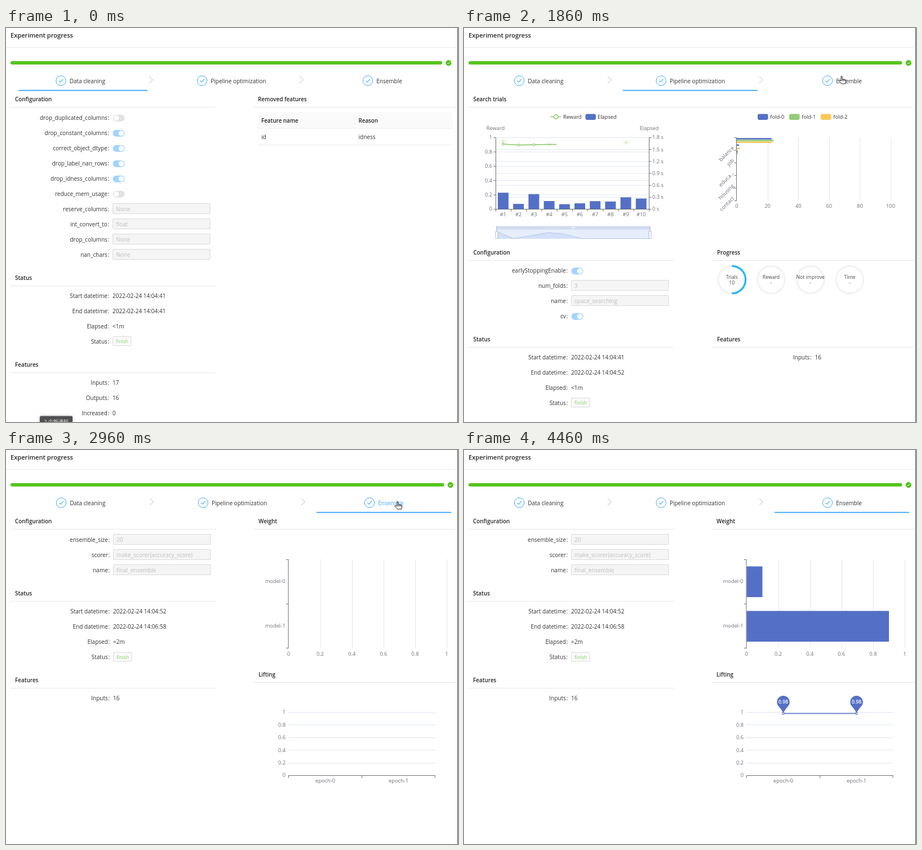
Animation of 802 by 699 pixels, one loop 7.05 s. Source, as an HTML page with a canvas:

```html
<!DOCTYPE html>
<html lang="en">
<head>
<meta charset="utf-8">
<title>Experiment progress</title>
<style>
  html, body { margin: 0; width: 100%; height: 100%; overflow: hidden; background: #fff; }
  canvas { display: block; }
</style>
</head>
<body>
<canvas id="stage" width="802" height="699"></canvas>
<script>
const ctx = document.getElementById('stage').getContext('2d');
const LOOP = 7050, CHART_TIME = 1000;
const PIPELINE_AT = 1480, PIPELINE_CHART = 1465;
const ENSEMBLE_AT = 2960, ENSEMBLE_CHART = 2915;
const FONT = '"Open Sans", "Noto Sans", "Noto Sans CJK SC", sans-serif';
const INK = '#333', AXIS = '#6e7079', GRID = '#e0e6f1', SKY = '#40a9ff';
const BLUE = '#5470c6', GREEN = '#91cc75', YELLOW = '#fac858';

const clamp = v => Math.min(1, Math.max(0, v));
const cubicInOut = p => p < .5 ? 4 * p ** 3 : 1 - 4 * (1 - p) ** 3;

// ---------- drawing helpers ----------
function text(s, x, y, { size = 10, color = INK, align = 'left', weight = 400 } = {}) {
  ctx.font = `${weight} ${size}px ${FONT}`;
  ctx.fillStyle = color;
  ctx.textAlign = align;
  ctx.fillText(s, x, y + size * .36);
}
function rect(x, y, w, h, color) {
  ctx.fillStyle = color;
  ctx.fillRect(x, y, w, h);
}
function box(x, y, w, h, r, fill, stroke) {
  ctx.beginPath();
  ctx.roundRect(x, y, w, h, r);
  ctx.fillStyle = fill;
  ctx.fill();
  if (stroke) { ctx.strokeStyle = stroke; ctx.lineWidth = 1; ctx.stroke(); }
}
function path(points, color, width = 1) {
  ctx.beginPath();
  points.forEach(([x, y]) => ctx.lineTo(x, y));
  ctx.strokeStyle = color;
  ctx.lineWidth = width;
  ctx.stroke();
}
const hline = (x1, x2, y, color) => path([[x1, y], [x2, y]], color);
const vline = (x, y1, y2, color) => path([[x, y1], [x, y2]], color);
function ring(x, y, r, color, width, fill, from = 0, to = 2 * Math.PI) {
  ctx.beginPath();
  ctx.arc(x, y, r, from, to);
  if (fill) { ctx.fillStyle = fill; ctx.fill(); }
  ctx.strokeStyle = color;
  ctx.lineWidth = width;
  ctx.stroke();
}
const tick = (x, y, s, color, width) =>
  path([[x - 3.6 * s, y + .2 * s], [x - 1 * s, y + 2.8 * s], [x + 3.8 * s, y - 2.8 * s]], color, width);
const chartText = (s, x, y, align = 'center', color = AXIS) => text(s, x, y, { size: 9.3, color, align });

// ---------- form parts ----------
function section(title, x, y, from, to) {
  text(title, x, y, { size: 9.9, weight: 600, color: '#262626' });
  hline(from, to, y + 14.5, '#e8e8e8');
}
function label(s, x, y) {
  text(s, x - 9.2, y, { align: 'right' });
  text(':', x - 8.4, y);
}
function valueRow(name, value, x, y) {
  label(name, x, y);
  text(value, x, y);
}
function switchRow(name, on, x, y) {
  label(name, x, y);
  box(x + .5, y - 5.3, 21, 12, 6, on ? '#a3d3ff' : '#e2e2e2');
  ctx.beginPath();
  ctx.arc(x + (on ? 15.5 : 6.5), y + .7, 4.7, 0, 7);
  ctx.fillStyle = '#fff';
  ctx.fill();
}
function fieldRow(name, value, x, y) {
  label(name, x, y);
  box(x + .5, y - 9.5, 172.5, 18, 1, '#f4f5f4', '#d9d9d9');
  text(value, x + 6, y, { color: '#bfbfbf' });
}
function statusRows(x, y, start, end, elapsed) {
  valueRow('Start datetime', start, x, y);
  valueRow('End datetime', end, x, y + 27);
  valueRow('Elapsed', elapsed, x, y + 54);
  label('Status', x, y + 81);
  box(x + .5, y + 72.5, 32.5, 16, 1, '#fafafa', '#d9d9d9');
  text('finish', x + 6, y + 81, { size: 8.7, color: '#87d068' });
}

// ---------- chart parts ----------
function pin(x, y, k, value, color, alpha = k) {
  const cy = y - 20 * k, r = 11.3 * k;
  ctx.save();
  ctx.globalAlpha = alpha;
  ctx.beginPath();
  ctx.arc(x, cy, r, Math.PI * .85, Math.PI * .15);
  ctx.quadraticCurveTo(x + 3.5 * k, cy + 12.5 * k, x, y - k);
  ctx.quadraticCurveTo(x - 3.5 * k, cy + 12.5 * k, x - r * .89, cy + r * .454);
  ctx.fillStyle = color;
  ctx.fill();
  ctx.globalAlpha = alpha * k;
  ctx.font = `600 8.6px ${FONT}`;
  ctx.textAlign = 'center';
  ctx.strokeStyle = color;
  ctx.lineWidth = 2;
  ctx.lineJoin = 'round';
  ctx.strokeText(value, x, cy + 3.1);
  text(value, x, cy, { size: 8.6, color: '#fff', align: 'center', weight: 600 });
  ctx.restore();
}
function sweptLine(points, edge, color, growth) {
  ctx.save();
  ctx.beginPath();
  ctx.rect(0, 0, edge, 699);
  ctx.clip();
  path(points, color, 1.6);
  ctx.restore();
  for (const [x, y] of points) {
    const k = clamp((edge - x) / growth);
    if (k > .15) ring(x, y, 1.8 * k, color, 1.2, '#fff');
  }
}

// ---------- pages ----------
function header(page, hovered) {
  const first = page === 0;
  text('Experiment progress', 8, 13.5, { size: 11.1, weight: 600, color: '#262626' });
  hline(0, 800, 34.5, '#ececec');
  const end = first ? 774 : 777.5;
  box(8, 58.7, end - 8, 6, 3, '#52c41a');
  ring(end + 11.2, 62, 4.7, '#52c41a', 1, '#52c41a');
  tick(end + 11.2, 62, .6, '#fff', 1);

  const names = ['Data cleaning', 'Pipeline optimization', 'Ensemble'];
  const icons = first ? [97.5, 348, 642] : [98, 349.7, 645];
  icons.forEach((x, i) => {
    ring(x, 93.5, 8.7, SKY, 1, '#fff');
    tick(x, 93.5, 1, SKY, 1.1);
    text(names[i], x + 15.2, 94, { color: i === hovered ? SKY : INK });
  });
  for (const x of first ? [254, 521] : [255, 524])
    path([[x, 86], [x + 6.5, 92], [x, 98]], '#bfbfbf');
  const [from, to] = [[22.5, 251], [282, 521], [551, 790]][page];
  rect(from, 109.8, to - from, 1.9, SKY);
  rect(801, 0, 1, 699, '#4a4a4a');
}

function cleaningPage() {
  const x = 189;
  section('Configuration', 16, 126, 8, 371);
  [['drop_duplicated_columns', 0], ['drop_constant_columns', 1], ['correct_object_dtype', 1],
   ['drop_label_nan_rows', 1], ['drop_idness_columns', 1], ['reduce_mem_usage', 0]]
    .forEach(([name, on], i) => switchRow(name, on, x, 159 + 27 * i));
  [['reserve_columns', 'None'], ['int_convert_to', 'float'], ['drop_columns', 'None'], ['nan_chars', 'None']]
    .forEach(([name, value], i) => fieldRow(name, value, x, 321 + 27 * i));
  section('Status', 16, 443, 8, 371);
  statusRows(x, 475, '2022-02-24 14:04:41', '2022-02-24 14:04:41', '<1m');
  section('Features', 16, 597, 8, 371);
  [['Inputs', 17], ['Outputs', 16], ['Increased', 0]]
    .forEach(([name, n], i) => valueRow(name, n, x, 629.5 + 27 * i));

  section('Removed features', 447, 126, 439, 800);
  rect(447, 149.5, 345, 29, '#fafafa');
  hline(447, 792, 178.5, '#f0f0f0');
  vline(619.5, 157, 171, '#ececec');
  hline(447, 792, 207.5, '#ececec');
  const bold = { size: 9.8, weight: 600, color: '#262626' };
  text('Feature name', 453, 164, bold);
  text('Reason', 625.5, 164, bold);
  text('id', 453, 193.5);
  text('idness', 625.5, 193.5);
}

function trialsChart(p) {
  const k = cubicInOut(p), left = 56.5, right = 328.5, top = 194.5, base = 321.5, band = 27.2;
  path([[154, 157.5], [172, 157.5]], GREEN, 1.8);
  ring(163, 157.5, 3.6, GREEN, 1.6, '#fff');
  chartText('Reward', 176, 157.5, 'left', INK);
  box(215.5, 152.5, 18.5, 10.5, 3, BLUE);
  chartText('Elapsed', 237, 157.5, 'left', INK);
  chartText('Reward', 56, 178);
  chartText('Elapsed', 328.5, 178);

  for (let i = 0; i <= 5; i++) {
    const y = top + i * 25.4;
    hline(left, right, y, GRID);
    hline(left - 4, left, y, AXIS);
    chartText(String((10 - 2 * i) / 10), 50, y - .5, 'right');
  }
  for (let i = 0; i <= 6; i++) {
    const y = top + i * 21.17;
    hline(left, right, y, GRID);
    hline(right, right + 4, y, AXIS);
    chartText(i === 6 ? '0 s' : (1.8 - .3 * i).toFixed(1) + ' s', 334, y - .5, 'left');
  }
  [118, 38, 108, 58.5, 36, 42, 57.5, 55, 85, 76.5].forEach((h, i) => {
    rect(60 + band * i, base - h * k, 19, h * k, BLUE);
    chartText('#' + (i + 1), 69.5 + band * i, 331);
  });
  vline(left, top, base, AXIS);
  vline(right, top, base, AXIS);
  hline(left, right, base, AXIS);
  for (let i = 0; i <= 10; i++) vline(left + band * i, base, base + 4, AXIS);

  const rewards = [206, 207.6, 207.1, 206.5, 206.8, 207.6, 207.6, 207.6, 207.6, 207.6]
    .map((y, i) => [69.5 + band * i, y]);
  sweptLine(rewards, left + (right - left) * p + 6 * clamp(p * 10 - 8.5), GREEN, 25);
  if (k > 0) {
    pin(69.3, 206, k, '0.90', GREEN);
    pin(287.3, 207.6, k, '0.89', GREEN);
  }
}

function zoomSlider() {
  rect(57, 351.5, 274, 22.5, '#e6eefb');
  rect(57, 351.5, 274, 6, '#d2dbee');
  rect(191, 353.5, 6, 1.5, '#fff');
  const shape = [[58, 361], [88, 373.5], [150, 363], [177, 365.5], [208, 373.5], [330, 373.5]];
  ctx.beginPath();
  ctx.moveTo(58, 374);
  shape.forEach(([x, y]) => ctx.lineTo(x, y));
  ctx.fillStyle = '#d3e0f8';
  ctx.fill();
  path(shape, '#b5c5e9');
  for (const x of [58, 330]) {
    vline(x, 351.5, 374, '#acb8d1');
    box(x - 2, 360.5, 4, 13, 1, '#fff', '#acb8d1');
  }
}

function importanceChart(k) {
  [BLUE, GREEN, YELLOW].forEach((color, i) => {
    box(521 + 56 * i, 152.5, 18.5, 10.5, 3, color);
    chartText('fold-' + i, 543.3 + 56 * i, 157.5, 'left', INK);
  });
  for (let i = 0; i <= 5; i++) {
    const x = 484 + 54.6 * i;
    if (i) vline(Math.round(x) + .5, 194, 306.5, GRID);
    chartText(20 * i, x, 316);
  }
  [[250, 263.5, 251], [16.5, 0, 22], [6.5, 9, 0]].forEach((group, g) =>
    group.forEach((w, i) => rect(484, 195.2 + 11.3 * g + 3.1 * i, w * k, 2.6, [BLUE, GREEN, YELLOW][i])));
  vline(483.5, 194, 306.5, AXIS);
  for (let i = 0; i <= 5; i++) hline(479.5, 483.5, 194.5 + 22.4 * i, AXIS);
  ['balance', 'job', 'educa...', 'housing', 'contact'].forEach((name, i) => {
    ctx.save();
    ctx.translate(477.5, 211 + 22.4 * i);
    ctx.rotate(-Math.PI / 4);
    chartText(name, 0, 0, 'right');
    ctx.restore();
  });
}

function pipelinePage(p) {
  const x = 190;
  section('Search trials', 16.5, 126, 8, 800);
  trialsChart(p);
  zoomSlider();
  importanceChart(cubicInOut(p));

  section('Configuration', 16.5, 398, 8, 372);
  switchRow('earlyStoppingEnable', 1, x, 430.5);
  fieldRow('num_folds', '3', x, 457);
  fieldRow('name', 'space_searching', x, 484);
  switchRow('cv', 1, x, 511);
  section('Status', 16.5, 552, 8, 372);
  statusRows(x, 584, '2022-02-24 14:04:41', '2022-02-24 14:04:52', '<1m');

  section('Progress', 449, 398, 441, 800);
  [['Trials', 10], ['Reward', '-'], ['Not improve', '-'], ['Time', '-']].forEach(([name, value], i) => {
    const cx = 475.3 + 69.7 * i;
    ring(cx, 446.5, 24.3, '#f3f3f3', 3.4);
    if (!i) ring(cx, 446.5, 24.3, '#2db7f5', 3.4, null, -Math.PI / 2, Math.PI / 2);
    text(name, cx, 441.5, { size: 8.7, align: 'center', color: '#444' });
    text(value, cx, 452, { size: 8.7, align: 'center', color: '#444' });
  });
  section('Features', 449, 552, 441, 800);
  valueRow('Inputs', 16, 622.5, 584);
}

function weightChart(k) {
  for (let i = 0; i <= 5; i++) {
    const x = 501.5 + 56.1 * i;
    if (i) vline(Math.round(x) + .5, 194, 352, GRID);
    chartText(String(2 * i / 10), x, 362);
  }
  rect(501.5, 206.5, 28 * k, 54.5, BLUE);
  rect(501.5, 285.5, 252.5 * k, 54.5, BLUE);
  vline(501, 194, 352, AXIS);
  for (const y of [194.5, 273, 351.5]) hline(497, 501, y, AXIS);
  chartText('model-0', 495.5, 233, 'right');
  chartText('model-1', 495.5, 312, 'right');
}

function liftingChart(p) {
  const k = cubicInOut(p);
  for (let i = 0; i <= 5; i++) {
    const y = 577.5 - 22.4 * i;
    if (i) hline(501, 761.5, Math.floor(y) + .5, GRID);
    chartText(String(2 * i / 10), 496, y - .5, 'right');
  }
  hline(501, 761.5, 577.5, AXIS);
  for (const x of [501.5, 631.5, 761]) vline(x, 577.5, 582, AXIS);
  chartText('epoch-0', 566.5, 587);
  chartText('epoch-1', 696.5, 587);
  sweptLine([[566.5, 467.5], [696.5, 467.5]], 501 + 260 * p, BLUE, 15);
  if (k > 0) {
    pin(566.5, 467.3, k, '0.98', BLUE, 1 - (1 - k) ** 2);
    pin(696.5, 467.3, k, '0.98', BLUE);
  }
}

function ensemblePage(p) {
  const x = 190;
  section('Configuration', 16, 126, 8, 373);
  fieldRow('ensemble_size', '20', x, 159);
  fieldRow('scorer', 'make_scorer(accuracy_score)', x, 186);
  fieldRow('name', 'final_ensemble', x, 213);
  section('Status', 16, 254, 8, 373);
  statusRows(x, 286.5, '2022-02-24 14:04:52', '2022-02-24 14:06:58', '≈2m');
  section('Features', 16, 408, 8, 373);
  valueRow('Inputs', 16, x, 440.5);
  section('Weight', 448, 126, 439, 800);
  weightChart(cubicInOut(p));
  section('Lifting', 448, 398, 439, 800);
  liftingChart(p);
}

// ---------- overlays ----------
function notification(t) {
  ctx.save();
  ctx.globalAlpha = 1 - clamp((t - 20) / 130);
  ctx.shadowColor = 'rgba(0,0,0,.35)';
  ctx.shadowBlur = 4;
  box(60, 688.5, 58, 20, 2, '#505050');
  ctx.shadowBlur = 0;
  text('2 个新通知', 89, 699, { size: 9, color: '#eee', align: 'center' });
  ctx.restore();
}

// time, x, y of the pointer tip
const ROUTE = [[400, 105, 705], [820, 193, 52], [1090, 400, 88], [1480, 412, 91], [1860, 669, 85],
  [2100, 690, 87], [2400, 694, 88], [2530, 694, 90], [2750, 694, 91], [3050, 694, 91]];

function pointerAt(t) {
  const i = ROUTE.findIndex(stop => stop[0] > t);
  if (i < 1) return null;
  const [a, b] = [ROUTE[i - 1], ROUTE[i]], u = (t - a[0]) / (b[0] - a[0]), s = u * u * (3 - 2 * u);
  return [a[1] + (b[1] - a[1]) * s, a[2] + (b[2] - a[2]) * s];
}
function drawPointer([x, y], hand) {
  ctx.save();
  ctx.translate(x, y);
  const shape = new Path2D(hand
    ? 'M0 1Q1-.5 2 1V5.5L7 6.5Q9 7 8.7 9L7.7 14H1L-4 9Q-4.5 7.2-2.5 7.5L0 9Z'
    : 'M0 0V10L2.3 8L4 11.8L5.7 11L4.1 7.4H7.2Z');
  ctx.fillStyle = '#fff';
  ctx.fill(shape);
  ctx.strokeStyle = '#222';
  ctx.lineWidth = 1;
  ctx.stroke(shape);
  if (hand) for (const fx of [2.2, 4.4, 6.6]) vline(fx, 6, 9, '#222');
  ctx.restore();
}

function draw(t) {
  rect(0, 0, 802, 699, '#fff');
  const page = t < PIPELINE_AT ? 0 : t < ENSEMBLE_AT ? 1 : 2;
  const hovered = t > 1090 && t < PIPELINE_AT + 100 ? 1 : t > 1900 && t < 3050 ? 2 : -1;
  header(page, hovered);
  if (page === 0) cleaningPage();
  else if (page === 1) pipelinePage(clamp((t - PIPELINE_CHART) / CHART_TIME));
  else ensemblePage(clamp((t - ENSEMBLE_CHART) / CHART_TIME));
  if (t < 150) notification(t);
  const pointer = pointerAt(t);
  if (pointer) drawPointer(pointer, t > 1050);
}

const began = performance.now();
function frame() {
  draw((performance.now() - began) % LOOP);
  requestAnimationFrame(frame);
}
frame();
</script>
</body>
</html>
```
